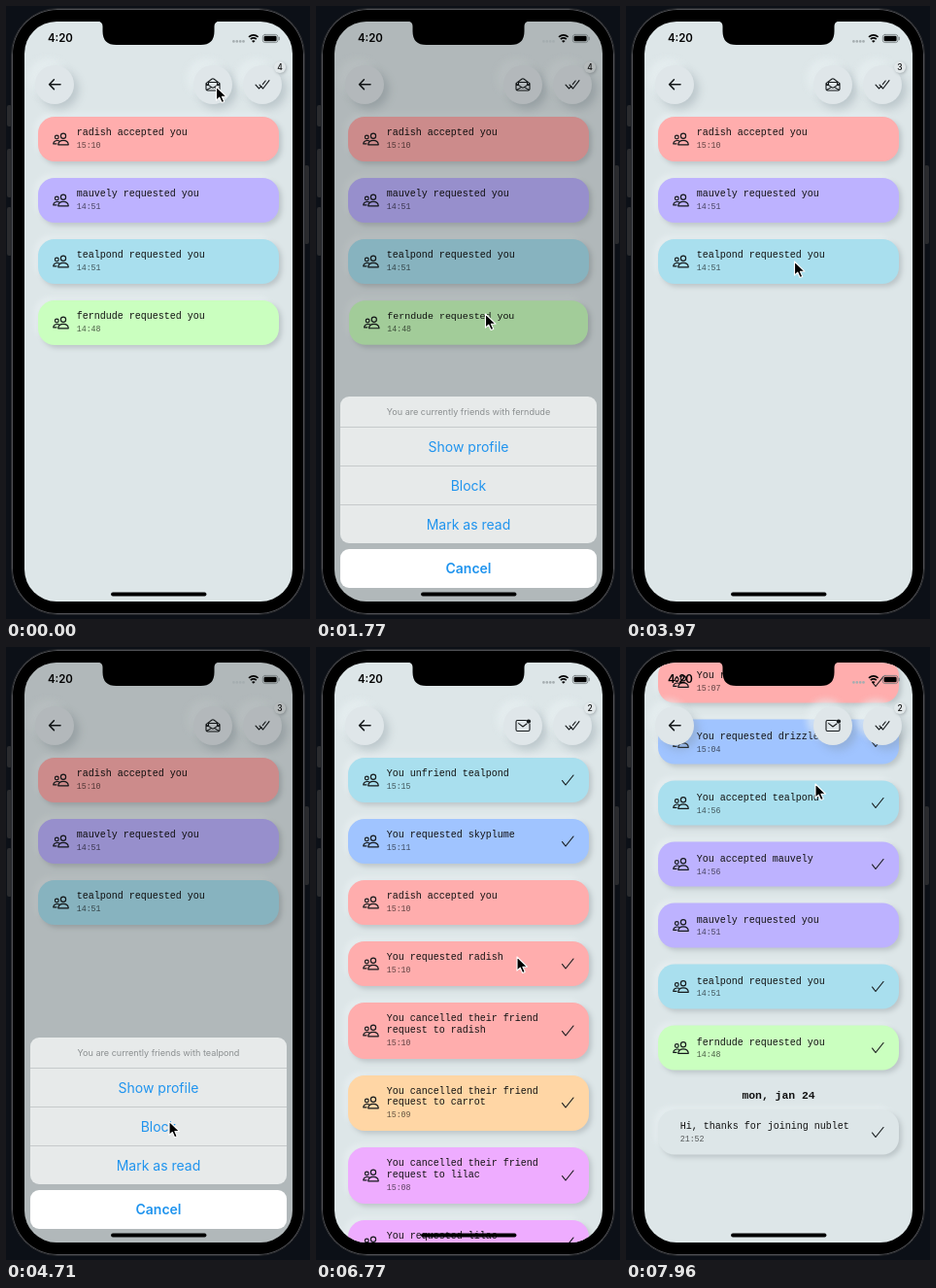
These frames come from a looping animation (313x631 px, 8 s). An HTML page:

```html
<!DOCTYPE html>
<html lang="en">
<head>
<meta charset="utf-8">
<title>Notifications</title>
<style>
  * { box-sizing: border-box; }
  html, body { margin: 0; width: 100%; height: 100%; overflow: hidden; background: #0c1017; }
  body { position: relative; font-family: Inter, sans-serif; color: #111; }
  svg { position: absolute; overflow: visible; fill: none; stroke: #15191b; stroke-linecap: round; stroke-linejoin: round; }
  #stage { position: absolute; left: 0; top: 0; width: 313px; height: 631px; overflow: hidden; }
  #stage > *, #screen > *, .round, .badge { position: absolute; }
  .key { width: 5px; background: #2a2b2e; border-radius: 2px; }
  .body { left: 5px; top: 2px; width: 303px; height: 625px; border-radius: 48px; background: #000;
    border: 1px solid #25272b; box-shadow: inset 0 0 0 1px #505156; }
  #screen { left: 19px; top: 16px; width: 276px; height: 597px; border-radius: 33px; overflow: hidden; background: #dde6e8; }
  .list { left: 14px; top: 98.3px; width: 248px; }
  .card { position: relative; border-radius: 17px; padding: 11.2px 48px 10.9px 39.7px; margin-bottom: 17px;
    font: 10px/11.5px "Liberation Mono", monospace; box-shadow: 3px 3px 5px #bdc6c9, -4px -4px 5px #e4ecee; }
  .card small { display: block; font-size: 8.3px; line-height: 11.5px; margin-top: .9px; position: relative; top: .5px; color: rgba(0,0,0,.62); }
  .card svg { top: 50%; }
  .note { padding-left: 22.7px; white-space: nowrap; }
  .day { font: bold 11.4px/18px "Liberation Mono", monospace; text-align: center; margin-bottom: 6px; }
  .round { top: 44.5px; width: 40px; height: 40px; border-radius: 50%; background: #dfe6e9;
    box-shadow: 5px 5px 9px rgba(120,138,146,.32), -7px -7px 7px rgba(232,240,242,.62); }
  .badge { left: 257px; top: 41px; width: 12px; height: 12px; border-radius: 50%; background: #e2e8ea;
    font: 500 8.5px/12px Inter, sans-serif; text-align: center; box-shadow: 1px 1px 3px #aab3b6; }
  #dim { inset: 0; background: #000; }
  #sheet { left: 6px; top: 386px; width: 264px; color: #2094ee; font-size: 14px; text-align: center; }
  .group { height: 151px; border-radius: 9px; overflow: hidden; background: #e7eaea; }
  .group div { height: 40px; line-height: 39px; border-top: 1px solid #c6cacb; }
  .group .title { height: 31px; line-height: 31px; font-size: 9.1px; color: #8b8f90; border: 0; }
  .cancel { height: 40px; line-height: 40px; margin-top: 5.5px; border-radius: 9px; background: #fff; font-weight: 600; }
  .clock { left: 43px; top: 26px; font-size: 11.4px; line-height: 15px; font-weight: 600; color: #000; }
</style>
</head>
<body>
<div id="stage">
  <div class="key" style="left:1px;top:102px;height:22px"></div>
  <div class="key" style="left:1px;top:147px;height:50px"></div>
  <div class="key" style="left:1px;top:207px;height:50px"></div>
  <div class="key" style="left:307px;top:164px;height:81px"></div>
  <div class="body"></div>
  <div id="screen">
    <div class="list" id="unread"></div>
    <div class="list" id="all"></div>
    <div class="round" style="left:11px"></div>
    <div class="round" id="mail" style="left:174px"></div>
    <div class="round" style="left:225px"></div>
    <div class="badge" id="badge"></div>
    <svg style="left:-19px;top:-16px" width="313" height="631" stroke-width="1.1">
      <path d="M56 80.7H44.6M49.4 75.8L44.6 80.7L49.4 85.6" stroke-width="1.6"/>
      <path d="M257 81.2L260.6 85L263 82.3M264.3 80.6L267.2 77M261 81.2L264.6 85L271 76.6"/>
      <g id="opened">
        <path d="M206 79.6L211.8 75.2Q213 74.3 214.2 75.2L220 79.6V85.4Q220 87 218.4 87H207.6Q206 87 206 85.4ZM206.4 80.3L213 84.4L219.6 80.3M206.7 86.4L211.5 83.5M219.3 86.4L214.5 83.5"/>
        <path d="M208.5 81V78.5H217.5V81"/>
      </g>
      <g id="closed">
        <path d="M216.4 75.5H207.4Q206 75.5 206 77V85Q206 86.5 207.4 86.5H218.5Q220 86.5 220 85V79.4M208.6 78.6L213 82L217 79"/>
        <circle cx="218.9" cy="76.6" r="2.2" fill="#15191b" stroke="none"/>
      </g>
    </svg>
    <div id="dim"></div>
    <div id="sheet">
      <div class="group">
        <div class="title">You are currently friends with <span id="friend"></span></div>
        <div>Show profile</div><div>Block</div><div id="mark">Mark as read</div>
      </div>
      <div class="cancel">Cancel</div>
    </div>
  </div>
  <div class="clock">4:20</div>
  <svg style="left:0;top:0" width="313" height="631" stroke="none">
    <path fill="#000" stroke="none" d="M94 15.5Q99.5 16 99.5 21V26Q99.5 40 113.5 40H200.5Q214.5 40 214.5 26V21Q214.5 16 220 15.5Z"/>
    <g fill="#a5adb0" stroke="none"><circle cx="234.4" cy="36.4" r="1.3"/><circle cx="237.8" cy="36.4" r="1.3"/><circle cx="241.2" cy="36.4" r="1.3"/><circle cx="244.5" cy="36.4" r="1.3"/></g>
    <path d="M250 31.9Q254.8 27.8 259.6 31.9M251.8 34.2Q254.8 31.7 257.8 34.2" stroke="#000" stroke-width="1.7" stroke-linecap="butt"/>
    <path d="M253 35.9Q254.8 34.6 256.6 35.9L254.8 37.8Z" fill="#000" stroke="none"/>
    <rect x="264.3" y="29.4" width="15.6" height="8.2" rx="2.4" stroke="#737b7e" stroke-width=".8"/>
    <rect x="265.6" y="30.7" width="13" height="5.6" rx="1.3" fill="#000" stroke="none"/>
    <path d="M281.2 32.2V34.8" stroke="#737b7e"/>
    <path d="M110 605.5H204.5" stroke="#000" stroke-width="3.8"/>
  </svg>
  <svg id="cursor" style="left:0;top:0" width="13" height="18">
    <path d="M0 0V14.2L3.3 11.2L5.6 16.5L8.2 15.4L5.9 10.2H10.4Z" fill="#000" stroke="#fff" stroke-width="1.1"/>
  </svg>
</div>
<script>
const $ = id => document.getElementById(id);
const red = '#ffadad', violet = '#bdb2ff', cyan = '#a9dfee', green = '#caffbf',
      blue = '#a0c4ff', amber = '#ffd6a5', pink = '#eeacff', plain = '#dde6e8';

const peopleIcon = `<svg style="left:14.5px;margin-top:-7px" width="17" height="14" stroke-width="1.15">
  <circle cx="11" cy="3.7" r="2.6"/><path d="M5.7 12.8C6 9.5 8 8.4 11 8.4S16 9.5 16.3 12.8Z"/>
  <circle cx="4.3" cy="5" r="1.9"/><path d="M6.6 8.8C3.4 7.9 1 9 .7 11.9H4"/></svg>`;
const checkIcon = `<svg style="left:219.5px;margin-top:-6px" width="13" height="12" stroke-width="1.15">
  <path d="M.5 6.5L4 11L12 1"/></svg>`;

function card([color, text, time, read]) {
  const note = color === plain;
  return `<div class="card${note ? ' note' : ''}" style="background:${color}">${note ? '' : peopleIcon}` +
    `${text}<small>${time}</small>${read ? checkIcon : ''}</div>`;
}
const cards = items => items.map(card).join('');
const cancelled = name => 'You cancelled their friend request to ' + name;

$('unread').innerHTML = cards([
  [red, 'radish accepted you', '15:10'],
  [violet, 'mauvely requested you', '14:51'],
  [cyan, 'tealpond requested you', '14:51'],
  [green, 'ferndude requested you', '14:48'],
]);
$('all').innerHTML = cards([
  [cyan, 'You unfriend tealpond', '15:15', 1],
  [blue, 'You requested skyplume', '15:11', 1],
  [red, 'radish accepted you', '15:10'],
  [red, 'You requested radish', '15:10', 1],
  [red, cancelled('radish'), '15:10', 1],
  [amber, cancelled('carrot'), '15:09', 1],
  [pink, cancelled('lilac'), '15:08', 1],
  [pink, 'You requested lilac', '15:08', 1],
  [amber, 'You requested carrot', '15:07', 1],
  [red, 'You requested radish', '15:07', 1],
  [blue, 'You requested drizzled', '15:04', 1],
  [cyan, 'You accepted tealpond', '14:56', 1],
  [violet, 'You accepted mauvely', '14:56', 1],
  [violet, 'mauvely requested you', '14:51'],
  [cyan, 'tealpond requested you', '14:51', 1],
  [green, 'ferndude requested you', '14:48', 1],
]) + '<div class="day">mon, jan 24</div>' +
  card([plain, 'Hi, thanks for joining nublet', '21:52', 1]);

const STEP = 147.2, LOOP = 8000;
const cursorTrack = [[3, 216.5, 83], [9, 174.5, 317], [13, 174.5, 317], [18, 165, 530], [21, 165, 530],
  [26, 173.5, 263], [29, 173.5, 263], [33, 167, 530], [35, 167, 530], [39, 208, 71], [41, 208, 71],
  [45, 207, 319], [46, 207, 319], [49, 195, 141]];
const sheetTrack = [[10, 0], [11, .7], [12, 1], [19, 1], [20, .5], [21, 0],
  [28, 0], [29, .7], [30, 1], [35, 1], [36, .4], [37, 0]];
const scrollTrack = [[46, 0], [47, 45], [48, 240], [49, 610], [50, 705.5], [54, 703.5]];

function sample(track, step) {
  const next = track.findIndex(key => key[0] > step);
  if (next < 0) return track.at(-1).slice(1);
  if (next === 0) return track[0].slice(1);
  const a = track[next - 1], b = track[next];
  const u = (step - a[0]) / (b[0] - a[0]), ease = u * u * (3 - 2 * u);
  return a.slice(1).map((v, i) => v + (b[i + 1] - v) * ease);
}

function render(now) {
  const step = Math.floor((now % LOOP + 8) / STEP);
  const [x, y] = sample(cursorTrack, step);
  const [open] = sample(sheetTrack, step);
  const [scroll] = sample(scrollTrack, step);
  const removed = step >= 37 ? 2 : step >= 21 ? 1 : 0;
  const showAll = step >= 41;

  $('cursor').style.transform = `translate(${x}px,${y}px)`;
  $('dim').style.opacity = open * .2;
  $('sheet').style.transform = `translateY(${(1 - open) * 215}px)`;
  $('friend').textContent = step < 24 ? 'ferndude' : 'tealpond';
  $('mark').style.background = step === 19 || step === 35 ? '#d5d9da' : '';
  $('badge').textContent = 4 - removed;
  $('unread').style.display = showAll ? 'none' : '';
  $('all').style.display = showAll ? '' : 'none';
  $('all').style.transform = `translateY(${-scroll}px)`;
  $('opened').style.display = showAll ? 'none' : '';
  $('closed').style.display = showAll ? '' : 'none';
  [...$('unread').children].forEach((el, i) => {
    el.style.display = i < 4 - removed ? '' : 'none';
    const pressed = i === 3 ? step >= 10 && step <= 12 : i === 2 && step >= 28 && step <= 30;
    el.style.transform = pressed ? 'scale(.992)' : '';
  });
}

const start = performance.now();
(function tick() {
  render(performance.now() - start);
  requestAnimationFrame(tick);
})();
</script>
</body>
</html>
```
